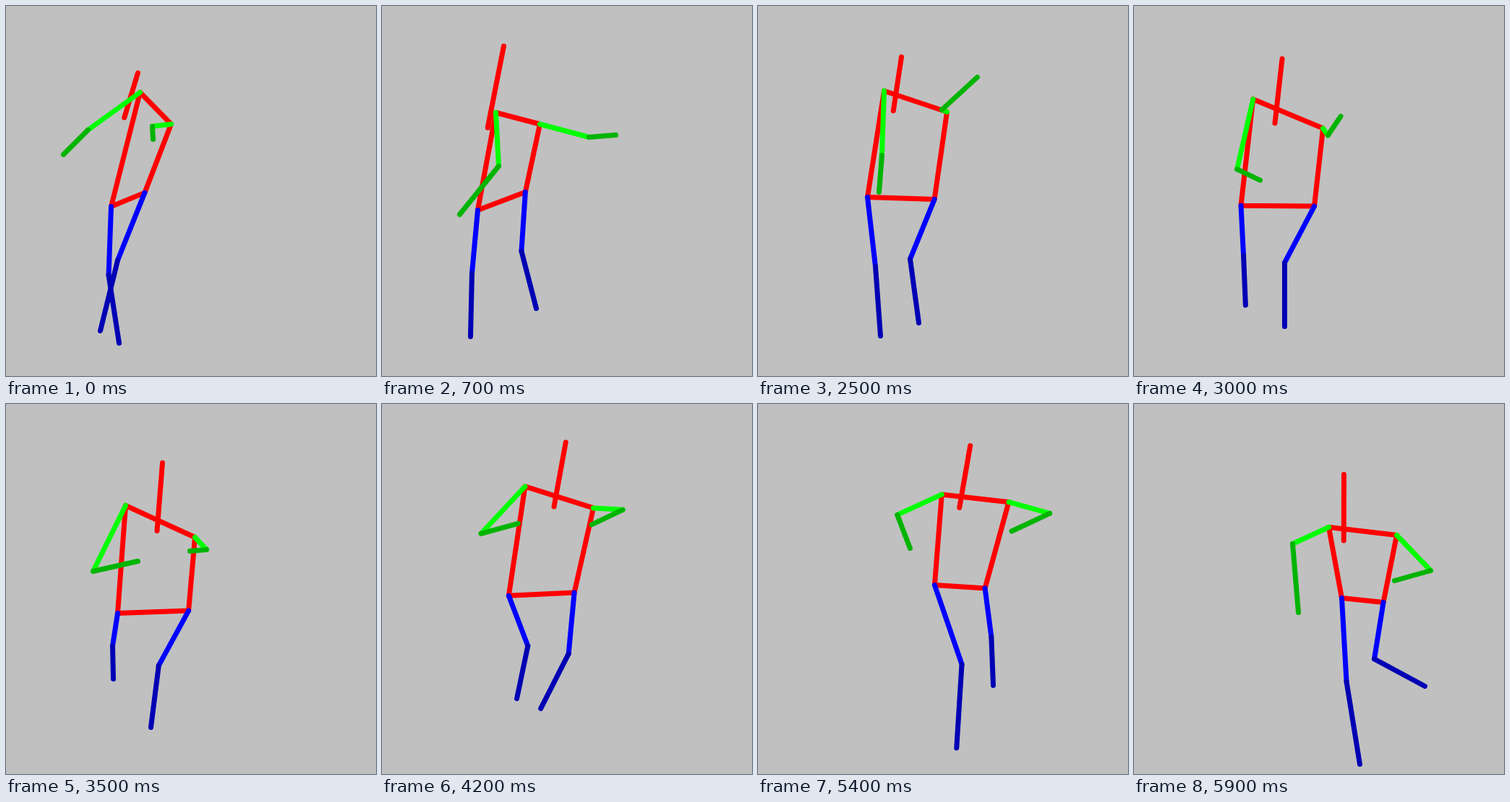
Animation, 512 px wide and 512 px high, one loop 6000 ms. Source, as an HTML page with a canvas:

```html
<!DOCTYPE html>
<html>
<head>
<meta charset="utf-8">
<style>
  html, body { margin: 0; width: 100%; height: 100%; overflow: hidden; background: #c0c0c0; }
  canvas { display: block; }
</style>
</head>
<body>
<canvas id="stage" width="512" height="512"></canvas>
<script>
const ctx = document.getElementById('stage').getContext('2d');
const LOOP = 6000, STEP = 100;
const TIMES = [0, 700, 1700, 2500, 3500, 4900, 5900];
const RED = '#f00', GREEN = '#0f0', DARK_GREEN = '#00b400', BLUE = '#00f', DARK_BLUE = '#0000b4';

// Smooth cubic curve through one value per key time
function curve(...values) {
  const last = TIMES.length - 1;
  const slope = i => {
    const a = Math.max(i - 1, 0), b = Math.min(i + 1, last);
    return (values[b] - values[a]) / (TIMES[b] - TIMES[a]);
  };
  return t => {
    let i = 0;
    while (i < last - 1 && t >= TIMES[i + 1]) i++;
    const span = TIMES[i + 1] - TIMES[i], u = (t - TIMES[i]) / span, v = 1 - u;
    return v * v * (1 + 2 * u) * values[i] + u * u * (3 - 2 * u) * values[i + 1] +
      span * u * v * (v * slope(i) - u * slope(i + 1));
  };
}

function path(xs, ys) {
  const x = curve(...xs), y = curve(...ys);
  return t => [x(t), y(t)];
}

const middle = (a, b) => [(a[0] + b[0]) / 2, (a[1] + b[1]) / 2];

const head = path([182, 168, 183, 198, 216, 289, 290], [92, 55, 153, 70, 81, 32, 97]);
const hip = path([145, 132, 184, 151, 154, 207, 287], [277, 282, 317, 264, 289, 241, 268]);

const left = {
  shoulder: path([185, 157, 194, 174, 165, 236, 269], [119, 147, 157, 117, 140, 95, 170]),
  elbow: path([113, 161, 171, 171, 120, 168, 219], [171, 221, 187, 206, 231, 132, 193]),
  hand: path([79, 107, 168, 167, 182, 196, 227], [205, 288, 252, 257, 217, 140, 288]),
  foot: path([156, 122, 163, 169, 148, 238, 312], [466, 457, 448, 456, 380, 452, 498]),
  bend: curve(-9, -3, -52, 2, -4, 40, -6),
};
const right = {
  shoulder: path([228, 218, 210, 261, 261, 328, 363], [163, 163, 158, 146, 184, 108, 181]),
  elbow: path([202, 286, 143, 254, 277, 388, 410], [166, 181, 139, 143, 201, 101, 230]),
  hand: path([203, 323, 128, 303, 254, 336, 360], [184, 178, 153, 98, 203, 131, 244]),
  foot: path([130, 213, 214, 222, 200, 262, 402], [449, 418, 473, 438, 447, 393, 390]),
  bend: curve(-7, -13, -36, -23, -16, 35, -46),
};

// The pelvis turns with the shoulders, narrows late and sways less and less.
function oppositeHip([x, y], shoulderSpan, t) {
  const u = t / LOOP;
  const sway = 15 * (1 - u) * Math.cos((t - 700) / 3600 * 2 * Math.PI);
  return [x + shoulderSpan * (1.08 - 0.5 * u ** 4), y + 20 * u - 14 - sway];
}

// The knee sits halfway down the leg, pushed sideways by the bend.
function kneeOf(hip, foot, bend) {
  const dx = foot[0] - hip[0], dy = foot[1] - hip[1], length = Math.hypot(dx, dy);
  const [x, y] = middle(hip, foot);
  return [x + bend * dy / length, y - bend * dx / length];
}

function line(color, ...points) {
  ctx.strokeStyle = color;
  ctx.beginPath();
  for (const point of points) ctx.lineTo(...point);
  ctx.stroke();
}

function limb(start, joint, end, upperColor, lowerColor) {
  line(upperColor, start, joint);
  line(lowerColor, joint, end);
}

function drawFigure(t) {
  const shoulders = [left.shoulder(t), right.shoulder(t)];
  const leftHip = hip(t);
  const hips = [leftHip, oppositeHip(leftHip, shoulders[1][0] - shoulders[0][0], t)];

  // The head line runs parallel to the spine and ends just below the shoulders.
  const chest = middle(...shoulders), pelvis = middle(...hips), top = head(t);
  const lean = (chest[0] - pelvis[0]) / (chest[1] - pelvis[1]);
  const neckY = chest[1] + 13;
  line(RED, top, [top[0] + (neckY - top[1]) * lean, neckY]);
  line(RED, ...shoulders, hips[1], hips[0], shoulders[0]);

  [left, right].forEach((side, i) => {
    const foot = side.foot(t);
    limb(shoulders[i], side.elbow(t), side.hand(t), GREEN, DARK_GREEN);
    limb(hips[i], kneeOf(hips[i], foot, side.bend(t)), foot, BLUE, DARK_BLUE);
  });
}

ctx.translate(0.5, 0.5);
ctx.lineWidth = 7;
ctx.lineCap = ctx.lineJoin = 'round';

function draw() {
  ctx.fillStyle = '#c0c0c0';
  ctx.fillRect(-1, -1, 514, 514);
  drawFigure(Math.floor(performance.now() % LOOP / STEP) * STEP);
  requestAnimationFrame(draw);
}
draw();
</script>
</body>
</html>
```
